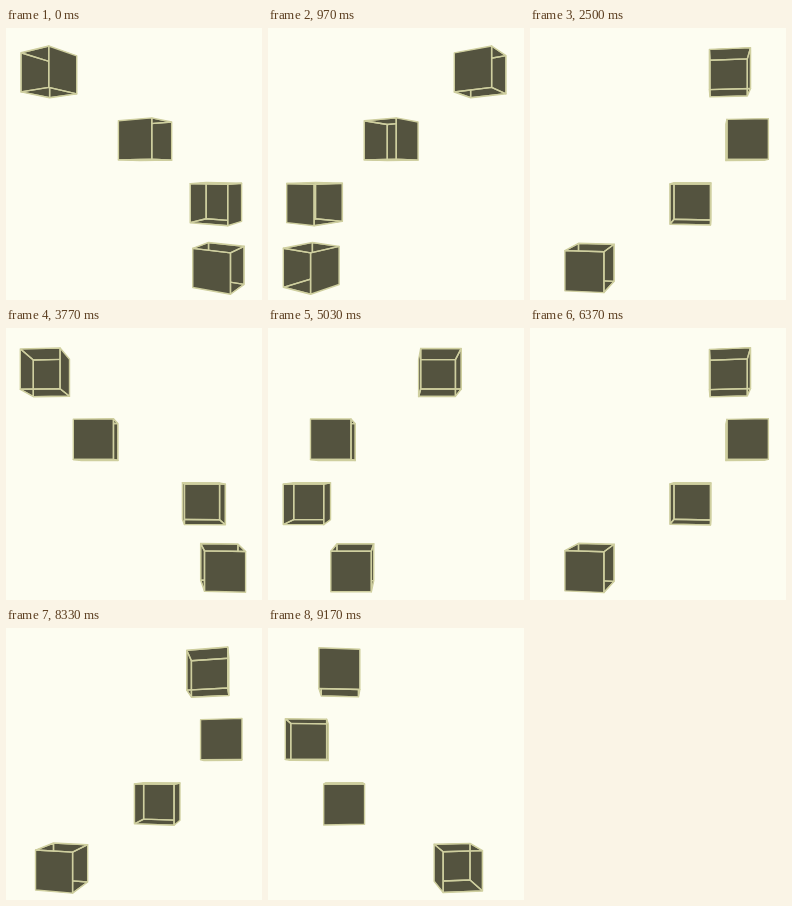
These frames come from a looping animation (256 by 272 pixels, 9.21 s). An HTML page with a canvas:

```html
<!DOCTYPE html>
<html lang="en">
<head>
<meta charset="utf-8">
<title>Sliding cubes</title>
<style>
html, body { margin: 0; width: 100%; height: 100%; overflow: hidden; background: #fdfdf1; }
canvas { display: block; width: 256px; height: 272px; }
</style>
</head>
<body>
<canvas id="stage" width="256" height="272"></canvas>
<script>
const ctx = document.getElementById('stage').getContext('2d');
const LOOP = 9210, STEP = 322.5, PHASE = 0.41, CYCLE = 6;
const EYE = 400, CX = 128, CY = 142, HALF = 19.3;
const ROWS = [-96.4, -29.3, 32.7, 96.6];
const BG = '#fdfdf1', FILL = '#54533f', LINE = '#cfcf9f';

// Sideways path: [step, x] there and back again.
const PATH = [
  [0, -88], [0.37, -85], [1, -43], [1.37, 10.5], [1.9, 60], [2.37, 82],
  [3, 88], [3.37, 85], [4.04, 39], [4.37, -2.5], [4.93, -57], [5.37, -80.5]
];

function knot(i) {
  const n = PATH.length, turn = Math.floor(i / n);
  const [s, x] = PATH[i - turn * n];
  return [s + CYCLE * turn, x];
}

function slope(i) {
  const [a, b, c] = [knot(i - 1), knot(i), knot(i + 1)];
  const l = b[0] - a[0], r = c[0] - b[0];
  return ((b[1] - a[1]) / l * r + (c[1] - b[1]) / r * l) / (l + r);
}

function pathX(s) {
  s %= CYCLE;
  let i = 0;
  while (knot(i + 1)[0] <= s) i++;
  const a = knot(i), b = knot(i + 1), d = b[0] - a[0];
  const u = (s - a[0]) / d, v = 1 - u;
  return a[1] * v * v * (1 + 2 * u) + b[1] * u * u * (3 - 2 * u)
    + d * u * v * (v * slope(i) - u * slope(i + 1));
}

// Each step eases in and out, so turning slows whenever a side faces us.
function easeSteps(v) {
  const n = Math.floor(v), p = v - n;
  return n + 0.25 * p + 0.375 * (1 - Math.cos(Math.PI * p));
}

function trace(pts) {
  ctx.beginPath();
  pts.forEach(([x, y]) => ctx.lineTo(x, y));
  ctx.closePath();
}

function area(pts) {
  return pts.reduce((sum, [x, y], i) => {
    const [nx, ny] = pts[(i + 1) % pts.length];
    return sum + x * ny - nx * y;
  }, 0);
}

function drawCube(x, y, yaw) {
  const ring = dy => [0, 1, 2, 3].map(k => {
    const a = yaw + Math.PI * (k / 2 + 0.25), r = HALF * Math.SQRT2;
    const scale = EYE / (EYE - r * Math.cos(a));
    return [CX + (x + r * Math.sin(a)) * scale, CY + (y + dy) * scale];
  });
  const top = ring(-HALF), bottom = ring(HALF);
  const faces = [0, 1, 2, 3].map(k => {
    const j = (k + 3) % 4;
    return { pts: [top[j], top[k], bottom[k], bottom[j]], solid: k % 2 === 1 };
  });
  faces.push({ pts: [...top].reverse() }, { pts: bottom });

  const near = faces.filter(f => area(f.pts) > 0);
  const far = faces.filter(f => area(f.pts) <= 0);
  ctx.strokeStyle = LINE;
  ctx.lineWidth = 1.4;
  ctx.lineJoin = 'round';
  for (const f of near) {
    ctx.save();
    trace(f.pts);
    ctx.fillStyle = FILL;
    ctx.fill();
    ctx.clip();
    if (!f.solid) {
      for (const b of far) {
        trace(b.pts);
        ctx.stroke();
      }
    }
    ctx.restore();
  }
  for (const f of near) {
    trace(f.pts);
    ctx.stroke();
  }
}

function draw(t) {
  ctx.fillStyle = BG;
  ctx.fillRect(0, 0, 256, 272);
  ROWS.forEach((y, row) => {
    const s = easeSteps(t / STEP + row + PHASE);
    drawCube(pathX(s), y, -s * Math.PI / 2);
  });
}

const start = performance.now();
function tick() {
  draw((performance.now() - start) % LOOP);
  requestAnimationFrame(tick);
}
tick();
</script>
</body>
</html>
```
